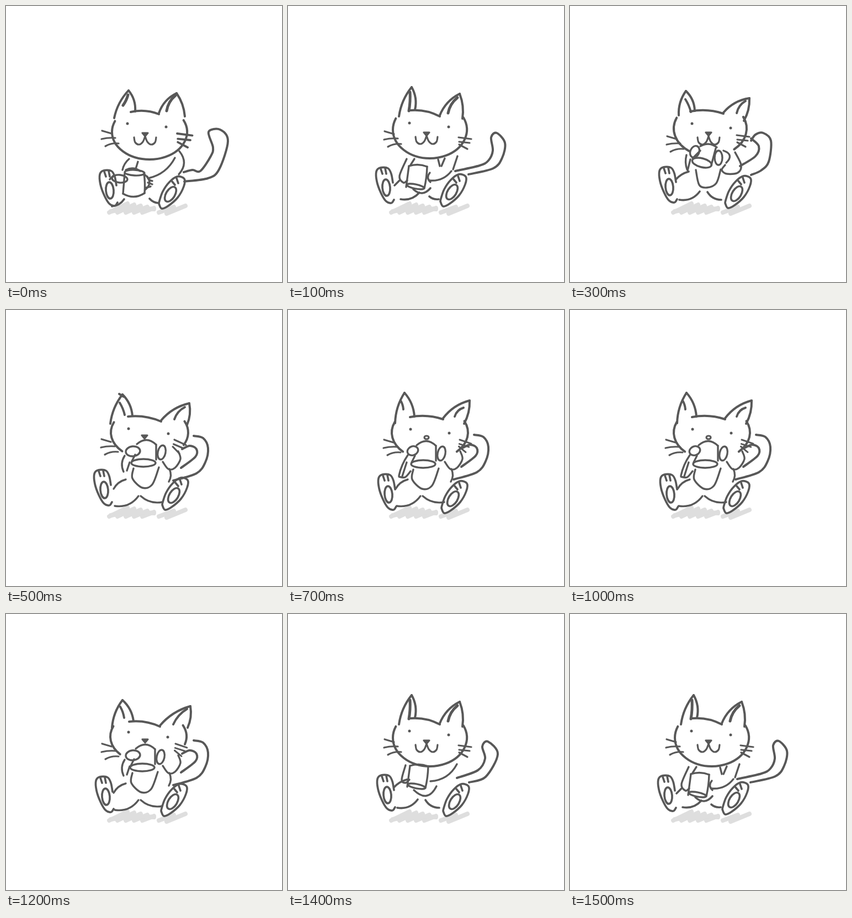
An HTML page with a canvas that plays this animation: 500x500 px, repeating every 1600 ms.

```html
<!DOCTYPE html>
<html lang="en">
<head>
<meta charset="utf-8">
<title>Cat with a mug</title>
<style>
html, body { margin: 0; width: 100%; height: 100%; overflow: hidden; background: #fff; }
canvas { display: block; width: 100%; height: 100%; }
</style>
</head>
<body>
<canvas id="stage" width="500" height="500"></canvas>
<script>
const ctx = document.getElementById('stage').getContext('2d');
const INK = '#585858', SHADE = '#dedede', STEP = 100;
const rad = deg => deg * Math.PI / 180;

function pen(width, color = INK) {
  ctx.lineWidth = width;
  ctx.strokeStyle = ctx.fillStyle = color;
}

// Arc-like stroke bulging by k to the left of its direction.
function bow(x1, y1, x2, y2, k = 0) {
  const dx = x2 - x1, dy = y2 - y1, n = 2 * k / Math.hypot(dx, dy);
  ctx.beginPath();
  ctx.moveTo(x1, y1);
  ctx.quadraticCurveTo((x1 + x2) / 2 + dy * n, (y1 + y2) / 2 - dx * n, x2, y2);
  ctx.stroke();
}

function oval(x, y, rx, ry, tilt = 0, from = 0, to = 360) {
  ctx.beginPath();
  ctx.ellipse(x, y, rx, ry, tilt, rad(from), rad(to));
  ctx.stroke();
}

// Smooth curve through the points (Catmull-Rom as Béziers).
function curve(...xy) {
  const n = xy.length / 2;
  const at = i => { const j = 2 * Math.max(0, Math.min(n - 1, i)); return [xy[j], xy[j + 1]]; };
  ctx.beginPath();
  ctx.moveTo(...at(0));
  for (let i = 0; i < n - 1; i++) {
    const a = at(i - 1), b = at(i), c = at(i + 1), d = at(i + 2);
    ctx.bezierCurveTo(b[0] + (c[0] - a[0]) / 6, b[1] + (c[1] - a[1]) / 6,
      c[0] - (d[0] - b[0]) / 6, c[1] - (d[1] - b[1]) / 6, ...c);
  }
  ctx.stroke();
}

function shifted(x, y, draw, scale = 1, tilt = 0) {
  ctx.save();
  ctx.translate(x, y);
  ctx.rotate(tilt);
  ctx.scale(scale, scale);
  draw();
  ctx.restore();
}

function dot(x, y, size) {
  ctx.beginPath();
  ctx.arc(x, y, size / 2, 0, 7);
  ctx.fill();
}

// Each ear: outer base, tip, other base.
function ears(ax, ay, tx, ty, bx, by, cx, cy, ux, uy, dx, dy) {
  pen(4);
  bow(ax, ay, tx, ty, 4);
  bow(tx, ty, bx, by, 4);
  bow(bx - 8, by + 1, cx, cy + 2, 4);
  bow(cx, cy, ux, uy, 5);
  bow(ux, uy, dx, dy, 3);
}

function innerEars(x1, y1, x2, y2, x3, y3, x4, y4) {
  bow(x1, y1, x2, y2, 1);
  bow(x3, y3, x4, y4, -3);
}

// The chin stays open between the angles right and left.
function head(x, y, rx, ry, right = 90, left = 90) {
  pen(4);
  oval(x, y, rx, ry, 0, -25, right);
  oval(x, y, rx, ry, 0, left, 203);
}

function eyes(x1, y1, x2, y2) {
  pen(3.2);
  dot(x1, y1, 5);
  dot(x2, y2, 5);
}

function nose(x, y) {
  ctx.beginPath();
  ctx.moveTo(x - 5, y);
  ctx.lineTo(x + 5, y);
  ctx.lineTo(x, y + 6);
  ctx.closePath();
  ctx.fill();
  ctx.stroke();
}

function smile(x, y) {
  for (const s of [-1, 1]) curve(x, y, x + 4 * s, y + 10, x + 11 * s, y + 15, x + 18 * s, y + 11, x + 20 * s, y + 2);
}

function whiskers(dx, dy, x, y, scale = 1, tilt = 0) {
  shifted(dx, dy, () => {
    bow(174, 226, 191, 231);
    bow(173, 241, 198, 239, 1);
    bow(180, 254, 204, 249, 2);
  });
  shifted(x, y, () => {
    bow(0, 0, 23, 3);
    bow(1, 8, 20, 10);
    bow(1, 13, 16, 21);
  }, scale, tilt);
}

function feet(lx, ly, rx, ry) {
  pen(3.7);
  shifted(lx, ly, () => {
    curve(195, 353, 190, 359, 180, 355, 171, 340, 164, 320, 163, 302, 170, 295, 184, 296, 190, 306, 193, 322);
    oval(181, 331, 7, 15, -.08);
    bow(171, 297, 174, 306);
    bow(179, 296, 181, 306);
  });
  shifted(rx, ry, () => {
    curve(281, 357, 282, 352, 288, 335, 300, 318, 314, 308, 327, 312, 326, 326, 315, 346, 298, 361, 286, 366, 281, 357);
    oval(302, 340, 8, 15, .55);
    bow(305, 317, 310, 323);
    bow(313, 311, 316, 320);
  });
}

function sit() {
  ears(196, 203, 222, 153, 234, 191, 277, 194, 309, 158, 324, 200);
  pen(5);
  innerEars(221, 161, 212, 180, 307, 162, 291, 190);
  head(260, 228, 68, 50);
  eyes(220, 213, 290, 219);
  nose(252, 230);
  smile(252, 236);
  whiskers(0, 0, 310, 231, 1.2);
  pen(3.4);
  bow(223, 277, 211, 297, -2);
  oval(206, 313, 14, 7, .1);
  bow(239, 282, 235, 295);
  bow(306, 275, 258, 312, 7);
  bow(314, 263, 313, 305, 9);
  bow(256, 309, 265, 317, -2);
  bow(257, 320, 265, 323);
  bow(254, 329, 262, 327);
  oval(233, 302, 18, 5, .05);
  bow(217, 297, 243, 299, 4);
  bow(215, 303, 212, 340);
  bow(212, 340, 251, 339, -6);
  bow(250, 303, 251, 339, 1);
  bow(252, 306, 252, 333, 8);
  feet(7, 3, -4, 1);
  bow(192, 363, 214, 350, -3);
  bow(188, 314, 194, 308);
  bow(260, 349, 277, 357, -2);
  pen(4);
  curve(322, 301, 338, 297, 352, 299, 371, 272, 375, 256, 367, 228, 388, 224, 402, 245, 386, 296, 366, 312, 323, 318);
}

function leanHead() {
  ears(201, 200, 224, 147, 230, 188, 275, 198, 311, 159, 316, 204);
  pen(5);
  innerEars(221, 156, 219, 190, 307, 166, 290, 194);
  head(257, 224, 67, 52);
  eyes(220, 212, 291, 219);
  nose(251, 229);
  smile(251, 235);
  whiskers(1, 1, 309, 238);
  pen(3.4);
}

function cup() {
  bow(219, 290, 214, 328);
  bow(219, 290, 252, 291, 3);
  bow(252, 291, 247, 330, 1);
  oval(231, 327, 16, 4, .2);
}

function lean() {
  leanHead();
  curve(215, 277, 202, 308, 209, 320, 216, 316);
  bow(229, 277, 222, 288);
  bow(272, 278, 275, 290);
  bow(284, 276, 278, 290);
  bow(307, 272, 299, 296);
  bow(296, 299, 256, 316, 6);
  bow(257, 302, 258, 319, -4);
  cup();
  feet(-3, -2, -5, -3);
  bow(193, 325, 202, 316);
  bow(204, 350, 238, 338, -5);
  bow(227, 332, 258, 330, -8);
  bow(256, 345, 273, 350, -2);
  pen(4);
  curve(303, 299, 347, 289, 363, 280, 371, 262, 368, 238, 378, 230, 393, 248, 388, 275, 372, 294, 327, 305);
}

function raisedLegs() {
  feet(-1, -3, 0, 0);
  bow(192, 314, 215, 300, 2);
  bow(198, 351, 235, 336, -6);
  bow(249, 337, 274, 351, -4);
}

function lift() {
  leanHead();
  curve(213, 274, 206, 300, 213, 306, 220, 300);
  bow(306, 272, 258, 303, 8);
  shifted(2, -15, cup);
  bow(228, 319, 269, 312, -14);
  raisedLegs();
  pen(4);
  curve(306, 297, 344, 283, 357, 262, 352, 240, 362, 231, 380, 254, 358, 295, 328, 305);
}

function raise() {
  ears(197, 198, 210, 154, 226, 190, 278, 193, 325, 167, 315, 208);
  innerEars(209, 169, 219, 192, 318, 172, 302, 194);
  head(254, 222, 66, 50, 49, 125);
  eyes(221, 213, 291, 221);
  nose(251, 229);
  smile(251, 236);
  whiskers(2, 10, 302, 234);
  pen(3.4);
  oval(226, 264, 8, 11, .4);
  bow(211, 270, 212, 296, -2);
  bow(218, 278, 213, 298);
  bow(236, 254, 266, 256, 5);
  bow(236, 262, 222, 276);
  oval(239, 284, 18, 8, .25);
  bow(264, 258, 256, 288);
  oval(269, 275, 7, 13);
  bow(278, 262, 283, 284, 9);
  curve(281, 288, 275, 297, 284, 304, 304, 302, 310, 288, 299, 265);
  curve(228, 297, 234, 324, 248, 329, 265, 321, 273, 296);
  raisedLegs();
  pen(4);
  curve(328, 244, 336, 233, 350, 230, 364, 244, 360, 282, 346, 298, 328, 306);
  curve(328, 240, 342, 254, 336, 272, 308, 290);
}

function drink(dx, dy) {
  pen(3.4);
  shifted(dx, dy, () => {
    bow(235, 244, 270, 245, 8);
    bow(232, 263, 226, 275);
    bow(270, 245, 270, 272);
    oval(247, 278, 22, 7);
    oval(280, 259, 7, 13, .2);
    curve(229, 288, 227, 306, 245, 323, 263, 317, 275, 286);
  });
  curve(284, 275, 294, 288, 306, 286, 316, 270, 312, 256);
  bow(296, 288, 295, 311, 3);
  bow(195, 324, 217, 307, 3);
  bow(197, 355, 240, 337, -7);
  bow(244, 337, 283, 348, -5);
}

function sipTail(dx, dy) {
  pen(4);
  shifted(dx, dy, () => {
    curve(339, 228, 356, 232, 365, 250, 360, 276, 344, 296, 302, 309);
    curve(318, 252, 332, 246, 344, 252, 342, 266, 316, 286);
  });
}

function loweredArm() {
  oval(230, 256, 13, 9, -.1);
  bow(215, 264, 213, 293, -4);
  bow(224, 276, 219, 291);
}

function sipHigh() {
  ears(194, 205, 211, 150, 229, 193, 281, 196, 329, 164, 319, 206);
  innerEars(204, 164, 209, 180, 318, 177, 302, 193);
  head(257, 222, 69, 49, 45, 135);
  eyes(222, 216, 292, 223);
  oval(251, 231, 4, 3);
  whiskers(0, 9, 311, 235, .95, .2);
  drink(-2, 1);
  oval(226, 255, 10, 8, -.4);
  bow(217, 263, 201, 300, -2);
  bow(215, 276, 207, 301);
  curve(201, 302, 212, 303, 222, 292);
  feet(1, 3, -3, 2);
  sipTail(-2, -2);
}

function sipLow() {
  ears(189, 206, 211, 153, 229, 192, 281, 200, 332, 169, 328, 208);
  bow(205, 152, 213, 157);
  innerEars(206, 168, 215, 190, 324, 176, 305, 198);
  head(260, 222, 70, 48, 28, 135);
  eyes(222, 215, 294, 224);
  nose(251, 227);
  whiskers(-1, 8, 305, 235, 1, .3);
  drink(2, -1);
  loweredArm();
  feet(-3, -5, 2, -4);
  sipTail(1, 0);
}

function sipMid() {
  ears(192, 206, 211, 156, 231, 194, 279, 202, 334, 167, 329, 206);
  innerEars(207, 168, 214, 188, 328, 172, 303, 200);
  head(258, 222, 69, 48, 17, 138);
  eyes(222, 214, 293, 223);
  nose(252, 227);
  whiskers(0, 9, 307, 235, .95, .2);
  drink(0, 0);
  loweredArm();
  feet(0, 0, 0, 0);
  sipTail(1, 1);
}

function shadow() {
  pen(8, SHADE);
  for (let i = 0; i < 5; i++) bow(187 + 15 * i, 374, 220 + 12 * i, 358 + 2 * i);
  bow(277, 374, 304, 364);
  bow(291, 376, 325, 362);
  bow(190, 372, 268, 368, 3);
}

const sip = [sipHigh, sipLow, sipMid];
const sequence = [sit, lean, lift, raise, ...sip, ...sip, ...sip, raise, lift, lean];

function render() {
  const pose = sequence[Math.floor(performance.now() / STEP) % sequence.length];
  ctx.fillStyle = '#fff';
  ctx.fillRect(0, 0, 500, 500);
  ctx.lineCap = ctx.lineJoin = 'round';
  shadow();
  pose();
  requestAnimationFrame(render);
}
render();
</script>
</body>
</html>
```
